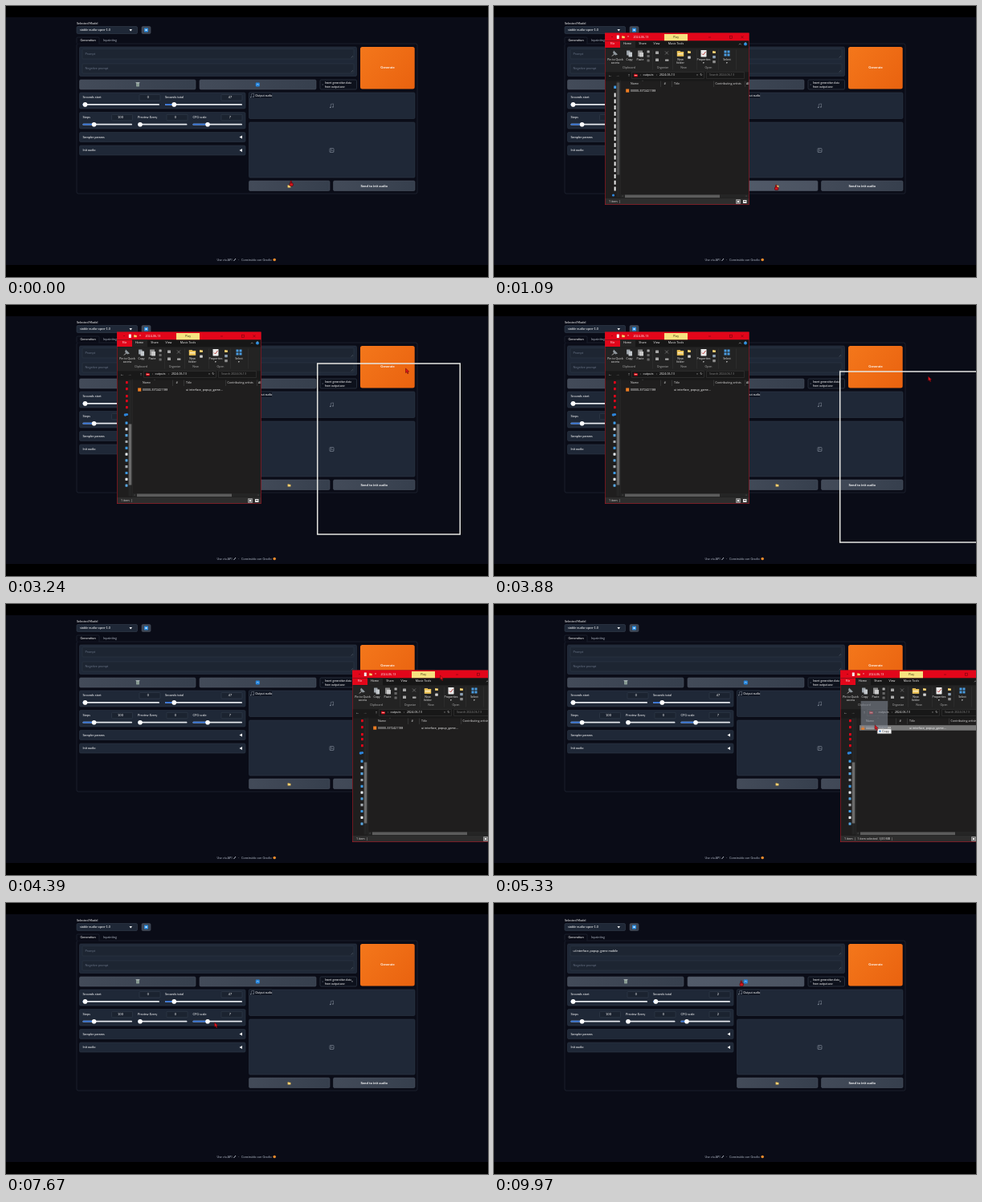
Recreate the animation shown at these times as an HTML page with a canvas. Size 600 by 338 pixels, loop 10000 ms.

```html
<!DOCTYPE html>
<html lang="en">
<head>
<meta charset="utf-8">
<title>Audio generator demo</title>
<style>
html, body { margin: 0; width: 100%; height: 100%; overflow: hidden; background: #000; }
canvas { display: block; width: 600px; height: 338px; }
</style>
</head>
<body>
<canvas id="stage"></canvas>
<script>
const W = 600, H = 338, LOOP = 10000;
const canvas = document.getElementById('stage');
const ctx = canvas.getContext('2d');
const dpr = window.devicePixelRatio || 1;
canvas.width = W * dpr;
canvas.height = H * dpr;

const UI = 'Lato, sans-serif', SYS = '"Open Sans", sans-serif';
const RED = '#e2061a', INK = '#fff', BLUE = '#2f6fd6';

const clamp = v => Math.max(0, Math.min(1, v));
const progress = (t, a, b) => clamp((t - a) / (b - a));
const ease = p => p * p * (3 - 2 * p);

function along(keys, t) {
  if (t <= keys[0][0]) return keys[0].slice(1);
  for (let i = 1; i < keys.length; i++) {
    const [t0, x0, y0] = keys[i - 1], [t1, x1, y1] = keys[i];
    if (t <= t1) {
      const p = ease((t - t0) / (t1 - t0));
      return [x0 + (x1 - x0) * p, y0 + (y1 - y0) * p];
    }
  }
  return keys[keys.length - 1].slice(1);
}

function rect(x, y, w, h, fill) {
  ctx.fillStyle = fill;
  ctx.fillRect(x, y, w, h);
}

function box(x, y, w, h, fill, stroke, r = 1.5) {
  ctx.beginPath();
  ctx.roundRect(x, y, w, h, r);
  if (fill) { ctx.fillStyle = fill; ctx.fill(); }
  if (stroke) { ctx.strokeStyle = stroke; ctx.lineWidth = 0.6; ctx.stroke(); }
}

function dot(x, y, r, fill) {
  ctx.fillStyle = fill;
  ctx.beginPath();
  ctx.arc(x, y, r, 0, 7);
  ctx.fill();
}

function path(points, fill, stroke, width = 0.6) {
  ctx.beginPath();
  points.forEach(([x, y], i) => i ? ctx.lineTo(x, y) : ctx.moveTo(x, y));
  if (fill) { ctx.closePath(); ctx.fillStyle = fill; ctx.fill(); }
  if (stroke) { ctx.strokeStyle = stroke; ctx.lineWidth = width; ctx.stroke(); }
}

function text(s, x, y, { size = 3.9, color = INK, align = 'left', font = UI, weight = 400 } = {}) {
  ctx.font = `${weight} ${size}px ${font}`;
  ctx.fillStyle = color;
  ctx.textAlign = align;
  ctx.textBaseline = 'middle';
  ctx.fillText(s, x, y);
}

const sys = (s, x, y, color = '#fff', align = 'left', size = 3.6) =>
  text(s, x, y, { size, color, align, font: SYS });

function gradient(x, y, w, h, from, to) {
  const g = ctx.createLinearGradient(x, y, x + w, y + h);
  g.addColorStop(0, from);
  g.addColorStop(1, to);
  return g;
}

// Web page

function block(x, y, w, h) { box(x, y, w, h, '#1f2837', '#2d3645'); }

function button(x, y, w, h, hover) {
  const fill = hover ? gradient(x, y, w, h, '#525b6a', '#4b5361') : gradient(x, y, w, h, '#434b59', '#363f4d');
  box(x, y, w, h, fill, '#4a5361');
}

function slider(label, x, y, w, value, max, numX) {
  const knob = x + 3 + (w - 6) * value / max;
  text(label, x, y);
  box(numX - 11, y - 3.5, 26, 7.5, '#1b2330', '#343e4d', 1);
  text(String(value), numX, y, { align: 'center' });
  box(x, y + 8, w, 1.8, '#e4e7ec', null, 0.9);
  box(x, y + 8, knob - x, 1.8, BLUE, null, 0.9);
  dot(knob, y + 8.9, 2.8, '#fff');
}

function note(x, y) {
  ctx.globalAlpha = 0.8;
  path([[x - 1.2, y + 2], [x - 1.2, y - 2], [x + 2, y - 2.6], [x + 2, y + 1.4]], null, '#9aa3b0', 0.5);
  dot(x - 1.8, y + 2, 0.8, '#9aa3b0');
  dot(x + 1.4, y + 1.5, 0.8, '#9aa3b0');
  ctx.globalAlpha = 1;
}

function folder(x, y, s, fill = '#f2c14e') {
  rect(x - s, y - s * 0.8, s, s * 0.4, fill);
  rect(x - s, y - s * 0.6, s * 2, s * 1.4, fill);
  rect(x - s * 0.8, y - s * 0.1, s * 1.6, s * 0.3, '#fff3cf');
}

function page(t) {
  const loaded = t >= 9880;
  rect(0, 0, W, H, '#000');
  rect(0, 14, W, 309, '#0a0c17');

  text('Selected Model', 88, 21.5);
  box(88, 25.5, 75.5, 9, '#1f2837', '#343e4d');
  text('stable-audio-open-1.0', 92, 30);
  path([[153.5, 29], [157, 29], [155.2, 31.4]], INK);
  button(169, 25.5, 11, 9);
  box(172, 27.5, 5, 5, '#2b8de0', null, 0.7);
  rect(173.5, 29, 2, 2, '#d5ebff');

  box(88, 47, 424, 187, null, '#262e3b', 2);
  box(88, 39, 28, 8, '#0a0c17', '#262e3b', 1.2);
  rect(88.5, 46.3, 27, 1.4, '#0a0c17');
  text('Generation', 92.5, 43.2);
  text('Inpainting', 121, 43.2, { color: '#a5adb9' });

  block(91.5, 51, 345, 36.5);
  box(95, 53.5, 338, 12.5, '#1d2532', '#2c3645', 1);
  box(95, 72, 338, 12, '#1d2532', '#2c3645', 1);
  if (loaded) text('ui interface, popup, game mobile', 98.5, 60);
  else text('Prompt', 98.5, 60, { color: '#657082' });
  text('Negative prompt', 98.5, 78.2, { color: '#657082' });
  for (const y of [64.5, 82.5]) {
    path([[429.5, y], [432, y - 2.5]], null, '#6b7483', 0.4);
    path([[431, y], [432, y - 1]], null, '#6b7483', 0.4);
  }

  button(91.5, 92, 144.5, 12);
  rect(162.2, 96, 3.6, 4.4, '#9fb3a8');
  rect(161.6, 95.3, 4.8, 0.8, '#cfd6d6');
  path([[163.4, 96.6], [163.4, 99.8]], null, '#59655f', 0.4);
  path([[164.7, 96.6], [164.7, 99.8]], null, '#59655f', 0.4);
  button(241, 92, 145, 12, t > 9150);
  box(310.8, 95.5, 5, 5, '#2384dd', null, 1);
  path([[312, 98.6], [313.3, 97], [314.6, 98.6]], null, '#cfe8ff', 0.6);

  const dropped = t >= 6760;
  box(391, 92, 45.5, 12, '#0d111c', '#394352');
  dot(394.2, 98, 0.6, '#7b8491');
  text('Insert generation data', 397, 96.3, { size: 3.4 });
  text('from output.wav', 397, 100.8, { size: 3.4 });
  if (dropped) text('×', 431, 97.5, { size: 3.4, align: 'center' });

  box(441, 51, 67.7, 52.5, gradient(441, 51, 68, 53, '#f4771b', '#e9620f'), null, 2.5);
  text('Generate', 475, 77, { size: 4.2, weight: 700, align: 'center' });

  block(91.5, 108, 206.5, 20);
  slider('Seconds start', 95.5, 114, 95.5, 0, 512, 177);
  slider('Seconds total', 198, 114, 96, loaded ? 2 : 47, 512, 279);
  block(91.5, 132.5, 206.5, 20.5);
  slider('Steps', 95.5, 138.8, 61.5, 100, 500, 142.5);
  slider('Preview Every', 164, 138.8, 61.5, 0, 100, 211);
  slider('CFG scale', 232.5, 138.8, 61.5, loaded ? 2 : 7, 25, 279);

  [['Sampler params', 157.5], ['Init audio', 174]].forEach(([label, y]) => {
    block(91.5, y, 206.5, 12);
    text(label, 95.5, y + 6);
    path([[290.5, y + 6], [294, y + 4], [294, y + 8]], INK);
  });

  block(302.5, 108, 206.5, 32.5);
  box(302.5, 108, 29, 7.5, '#111724', '#2d3645', 1);
  note(306.5, 111.8);
  text('Output audio', 310.3, 111.9, { size: 3.6 });
  note(405.5, 124.5);
  block(302.5, 145, 206.5, 69);
  box(403, 177.5, 5, 5, null, '#8b94a2', 0.8);
  dot(404.6, 179.1, 0.6, '#8b94a2');
  path([[403.3, 182], [406, 179.7], [408, 181.5]], null, '#8b94a2', 0.5);

  button(302.5, 218, 100.5, 12.5, t > 30 && t < 2000);
  folder(352.5, 225, 1.9);
  button(407.5, 218, 101.5, 12.5);
  text('Send to init audio', 458.2, 224.4, { size: 4.3, weight: 700, align: 'center' });

  const faint = '#aab2bf';
  text('Use via API', 262.5, 316.5, { size: 3.8, color: faint });
  path([[283.5, 318], [286, 315]], null, '#b3bac5', 1);
  text('·', 289.5, 316.5, { color: faint, align: 'center' });
  text('Construido con Gradio', 293, 316.5, { size: 3.8, color: faint });
  dot(334.2, 316.5, 1.8, '#e98a2c');
}

// File manager, drawn from its own top-left corner

function ribbon() {
  const mid = '#f0f0f0', low = '#b0b0b0';
  const label = (s, x, y, c = mid) => sys(s, x, y, c, 'center', 3.5);
  rect(0, 19, 180, 30, '#232323');

  path([[9, 29], [13, 25]], null, '#c8c8c8', 1);
  path([[11, 22], [16, 27], [13, 28], [10, 25]], '#8f979d');
  label('Pin to Quick', 13, 33.5);
  label('access', 13, 38);
  box(27, 22, 4.5, 6, '#9aa1a8', null, 0.4);
  box(29.5, 24, 4.5, 6, '#c3c8cc', null, 0.4);
  label('Copy', 30.5, 33.5);
  box(41, 22, 6, 7.5, '#8d8d8d', null, 0.5);
  box(43, 24.5, 5, 5.5, '#c9c9c9', null, 0.4);
  label('Paste', 44, 33.5);
  for (let i = 0; i < 3; i++) box(52.5, 22 + 5.5 * i, 3.2, 3, i ? '#666' : '#aaa', null, 0.5);
  label('Clipboard', 30, 44, low);

  box(63, 23, 4, 3.6, '#a5a5a5', null, 0.4);
  box(63, 32, 4, 3.6, '#a8a8a8', null, 0.4);
  path([[75, 23], [79, 27]], null, '#777', 0.8);
  path([[79, 23], [75, 27]], null, '#777', 0.8);
  box(75, 33, 4.5, 2.2, '#a6a6a6', null, 0.4);
  label('Organize', 72, 44, low);

  folder(94, 26, 4.2, '#ecc257');
  label('New', 94, 33.5);
  label('folder', 94, 38);
  folder(105, 24, 1.9, '#ecc257');
  box(103.2, 29, 3.6, 3.2, '#d0d0d0', null, 0.4);
  label('New', 98, 44, low);

  box(119.5, 21.5, 7, 8.5, '#ececec', null, 0.4);
  path([[121, 26], [122.5, 27.5], [125.5, 23.5]], null, '#b5302c', 0.9);
  label('Properties', 123, 33.5);
  label('▾', 123, 38);
  folder(136, 24, 1.9, '#ecc257');
  box(134.2, 28.5, 3.6, 3.2, '#8fa2b6', null, 0.4);
  box(134.2, 34.5, 3.6, 3.2, '#8e8e8e', null, 0.4);
  label('Open', 129, 44, low);

  for (let i = 0; i < 4; i++) rect(148.5 + 4 * (i % 2), 22 + 4 * (i >> 1), 3, 3, '#4a9ce0');
  label('Select', 152, 33.5);
  label('▾', 152, 38);
  for (const x of [59, 84, 114, 141, 163]) rect(x, 21, 0.4, 25, '#3c3c3c');
}

function sidebar(full) {
  if (full) {
    [63, 71, 80, 86, 94].forEach(y => box(11, y - 1.5, 2.8, 3.2, RED, null, 0.6));
    dot(10.5, 103.5, 1.8, '#2d86dd');
    dot(12.5, 103, 1.6, '#2d86dd');
    const tones = ['#3f9be6', '#e8edf2', '#58a6e0', '#a6adb4'];
    for (let i = 0; i < 11; i++) box(10.5, 112 + 7.8 * i, 3, 3.2, tones[i % 4], null, 0.4);
    rect(14.5, 60, 4, 145, '#252525');
    rect(14.7, 115, 3.6, 76, '#6a6a6a');
  } else {
    box(11.2, 66, 3, 3.5, '#3f9be6', null, 0.5);
    for (let i = 0; i < 16; i++) rect(11.6, 75 + 7.8 * i, 2, 5, '#ececec');
    dot(10.5, 202.5, 1.6, '#2d86dd');
    rect(14.5, 60, 4, 145, '#252525');
    rect(14.7, 62, 3.6, 115, '#4e4e4e');
  }
}

function explorer(t) {
  const selected = t >= 5000, listed = t >= 1000;
  ctx.save();
  ctx.beginPath();
  ctx.rect(0, 0, 179.5, 214.5);
  ctx.clip();
  rect(0, 0, 180, 215, '#1f1e1e');

  rect(0, 0, 180, 10, RED);
  box(14.8, 3, 3, 4.4, '#f4f4f4', null, 0.3);
  folder(23, 5.3, 1.8);
  path([[8, 5], [10, 5]], null, '#8b000a', 0.7);
  sys('▾', 29, 5.2, '#fff', 'center', 3);
  sys('2024-06-13', 35.5, 5.2);
  rect(74, 1.5, 29, 8.5, '#f6e27f');
  sys('Play', 88.5, 5.6, '#3a3310', 'center');
  const dark = '#75040d';
  path([[129, 5.5], [132, 5.5]], null, dark, 0.6);
  ctx.strokeStyle = dark;
  ctx.lineWidth = 0.6;
  ctx.strokeRect(155.5, 3.7, 3, 3);
  path([[169.5, 3.7], [172.5, 6.7]], null, dark, 0.6);
  path([[172.5, 3.7], [169.5, 6.7]], null, dark, 0.6);

  rect(0, 10, 180, 9, '#161616');
  rect(0, 10, 19, 8.5, RED);
  rect(19, 10, 19, 9, '#232323');
  [['File', 9.5], ['Home', 28], ['Share', 47], ['View', 64.5], ['Music Tools', 88.5]]
    .forEach(([s, x]) => sys(s, x, 13.9, '#fff', 'center'));
  path([[167, 14.8], [168.3, 13.3], [169.6, 14.8]], null, '#ccc', 0.5);
  dot(175, 13.9, 2, '#2788d8');
  sys('?', 175, 13.9, '#fff', 'center', 3);
  ribbon();

  rect(0, 49, 180, 11, '#191919');
  [['←', 6.5, '#ddd'], ['→', 16, '#777'], ['↑', 30, '#fff']].forEach(([s, x, c]) => sys(s, x, 52.7, c, 'center', 5));
  box(33.5, 49, 90, 8, '#181818', '#383838', 0);
  folder(38.5, 53, 2.2, RED);
  sys('›', 44, 52.6, '#bbb');
  sys('outputs', 47.5, 52.9);
  sys('›', 64, 52.6, '#bbb');
  sys('2024-06-13', 68, 52.9);
  sys('▾', 115, 52.9, '#aaa', 'center', 3);
  sys('↻', 120, 52.9, '#ccc', 'center', 4);
  box(126.5, 49, 47, 8, '#181818', '#383838', 0);
  sys('Search 2024-06-13', 130, 52.9, '#858585');

  sidebar(t >= 2080);
  rect(19, 59, 0.4, 146, '#333');
  sys('Name', 32, 63.2, '#e4e4e4');
  sys('⌃', 47, 61, '#999', 'center', 3);
  sys('#', 73.5, 63.2, '#e4e4e4');
  sys('Title', 86, 63.2, '#e4e4e4');
  sys('Contributing artists', 137.5, 63.2, '#e4e4e4');
  if (t >= 700) sys('Album', 176, 63.2, '#e4e4e4');
  for (const x of [69.5, 83, 135.5, 174]) rect(x, 60, 0.4, 7.5, '#555');

  if (listed) {
    if (selected) rect(24, 68.7, 156, 6.5, '#777');
    rect(26.2, 70, 4, 4.2, '#ef7d22');
    sys('00000-3372421188', 32, 72.3, '#fff', 'left', 3.5);
    if (t >= 2080) sys('ui interface, popup, game...', 86, 72.3);
  }

  rect(19.5, 201.5, 160, 4.5, '#252525');
  rect(25, 202, 118, 3.6, '#5c5c5c');
  sys('‹', 22, 203.5, '#aaa', 'center');
  sys('›', 176, 203.5, '#aaa', 'center');

  rect(0, 206.5, 180, 8.5, '#2d2d2d');
  sys(selected ? '1 item  |  1 item selected  3,00 MB  |' : listed ? '1 item  |' : '0 items  |', 5, 210.5, '#e8e8e8');
  box(163.5, 208, 5, 5, '#777', '#bbb', 0);
  rect(165, 209.5, 2, 2, '#eee');
  box(172, 208.5, 4.5, 4, '#eee', null, 0);
  rect(173, 209.5, 2.5, 1.2, '#555');

  ctx.strokeStyle = '#c01020';
  ctx.lineWidth = 1;
  ctx.strokeRect(0, 0, 179.5, 214.5);
  ctx.restore();
}

function showExplorer(t) {
  const shown = progress(t, 30, 260) * (1 - progress(t, 6740, 6900));
  if (shown <= 0) return;
  const moved = t >= 3900;
  const scale = 0.9 + 0.1 * (1 - (1 - shown) ** 3);
  ctx.save();
  ctx.globalAlpha = shown;
  ctx.translate(moved ? 431 : 138, moved ? 82.5 : 33.5);
  ctx.translate(90, 107);
  ctx.scale(scale, scale);
  ctx.translate(-90, -107);
  explorer(t);
  ctx.restore();
}

// Pointer: time, x, y
const POINTER = [
  [0, 353, 218], [1000, 353, 218], [1090, 349.5, 223], [1900, 349.5, 223], [2600, 247.5, 40],
  [2880, 247.5, 40], [3240, 497.5, 79], [3860, 540.5, 89], [4400, 540.5, 89], [4900, 478, 154],
  [5200, 478, 154], [6120, 408, 98], [6900, 408, 98], [7210, 400, 104], [7390, 372, 112],
  [7670, 259.5, 149], [8390, 268, 142], [9250, 306, 103], [9560, 306, 103], [9620, 306, 97], [10000, 306, 97]
];

function cursor(x, y, hand) {
  ctx.save();
  ctx.translate(x, y);
  if (hand) {
    box(1, 0, 1.4, 5, '#d3141c', '#4a0507', 0.7);
    box(0, 2.8, 4.4, 3.8, '#d3141c', '#4a0507', 1.2);
  } else {
    ctx.scale(0.75, 0.75);
    path([[0, 0], [0, 7.5], [1.8, 6], [3.2, 9], [4.6, 8.3], [3.3, 5.5], [5.6, 5.3], [0, 0]], '#e0141c', '#4a0507');
  }
  ctx.restore();
}

function dragging(t, x, y) {
  if (t >= 2900 && t < 3900) {
    ctx.strokeStyle = '#e6e6e2';
    ctx.lineWidth = 1.5;
    ctx.strokeRect(x - 109.8, y - 6, 177.5, 213);
  }
  if (t >= 5230 && t < 6740) {
    rect(x - 17.5, y - 30, 33.5, 34, 'rgba(125,132,144,0.6)');
    box(x + 3, y + 4.8, 17.5, 6, '#f3f3f3', '#777', 0.4);
    rect(x + 5, y + 7.4, 2.6, 0.8, '#2467b5');
    rect(x + 5.9, y + 6.5, 0.8, 2.6, '#2467b5');
    sys('Copy', x + 9.2, y + 7.8, '#222');
  }
}

function frame() {
  const t = performance.now() % LOOP;
  ctx.setTransform(dpr, 0, 0, dpr, 0, 0);
  const [x, y] = along(POINTER, t);
  page(t);
  showExplorer(t);
  dragging(t, x, y);
  cursor(x, y, t < 1950 || t > 9150);
  requestAnimationFrame(frame);
}
frame();
</script>
</body>
</html>
```
